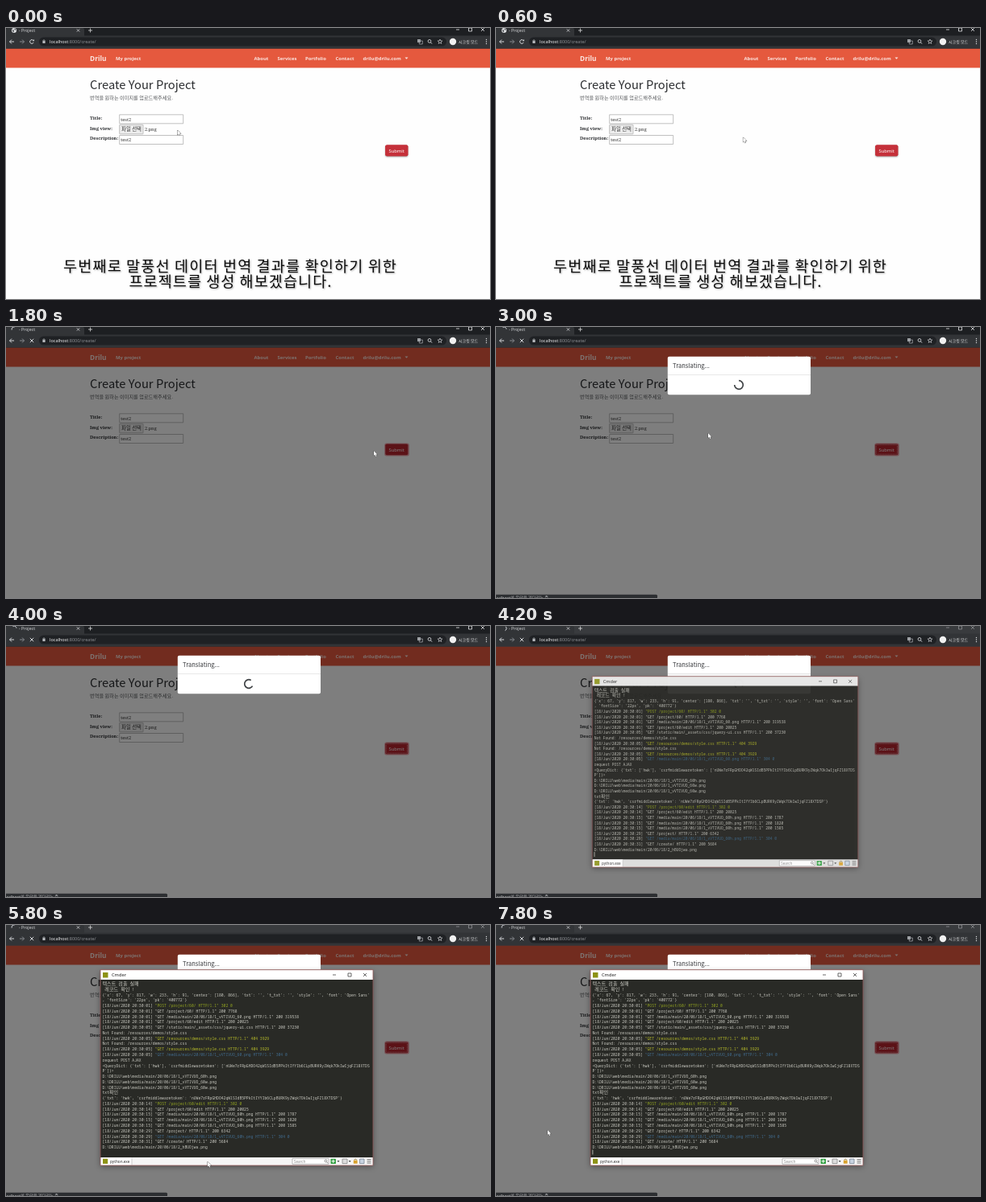
Animation, 600 px wide and 337 px high, one loop 8 s. Source, as an HTML page with a canvas:

```html
<!DOCTYPE html>
<html lang="ko">
<head>
<meta charset="utf-8">
<title>Create Your Project</title>
<style>
  html, body { margin: 0; width: 100%; height: 100%; overflow: hidden; background: #fff; }
  canvas { display: block; width: 100vw; height: 100vh; }
</style>
</head>
<body>
<canvas id="stage"></canvas>
<script>
const W = 600, H = 337, LOOP = 8000;
const canvas = document.getElementById('stage');
const ctx = canvas.getContext('2d');
const dpr = window.devicePixelRatio || 1;
canvas.width = W * dpr;
canvas.height = H * dpr;

const SANS = '"Noto Sans", "Noto Sans CJK KR", "Noto Sans CJK", sans-serif';
const KOREAN = '"Noto Sans CJK KR", "Noto Sans CJK", sans-serif';
const SERIF = '"Noto Serif", serif';
const MONO = '"Noto Sans Mono", monospace';

const clamp = v => Math.max(0, Math.min(1, v));
const progress = (t, start, end) => clamp((t - start) / (end - start));
const smooth = p => p * p * (3 - 2 * p);

// Small type is laid out ten times larger, which keeps its spacing even.
function text(str, x, y, size, color, font = SANS, weight = 400, spacing = 0) {
  ctx.save();
  ctx.translate(x, y);
  ctx.scale(0.1, 0.1);
  ctx.font = `${weight} ${size * 10}px ${font}`;
  ctx.letterSpacing = `${spacing * 10}px`;
  ctx.fillStyle = color;
  ctx.fillText(str, 0, 0);
  ctx.restore();
}

function rect(x, y, w, h, fill, radius = 0, stroke) {
  ctx.beginPath();
  ctx.roundRect(x, y, w, h, radius);
  if (fill) { ctx.fillStyle = fill; ctx.fill(); }
  if (stroke) { ctx.strokeStyle = stroke; ctx.lineWidth = 0.8; ctx.stroke(); }
}

function lines(color, width, ...paths) {
  ctx.strokeStyle = color;
  ctx.lineWidth = width;
  ctx.beginPath();
  for (const [x, y, ...rest] of paths) {
    ctx.moveTo(x, y);
    for (let i = 0; i < rest.length; i += 2) ctx.lineTo(rest[i], rest[i + 1]);
  }
  ctx.stroke();
}

function arc(x, y, r, color, width, from = 0, to = Math.PI * 2) {
  ctx.beginPath();
  ctx.arc(x, y, r, from, to);
  ctx.strokeStyle = color;
  ctx.lineWidth = width;
  ctx.stroke();
}

function disc(x, y, r, color) {
  ctx.beginPath();
  ctx.arc(x, y, r, 0, Math.PI * 2);
  ctx.fillStyle = color;
  ctx.fill();
}

function polygon(fill, ...points) {
  ctx.beginPath();
  for (let i = 0; i < points.length; i += 2) ctx.lineTo(points[i], points[i + 1]);
  ctx.closePath();
  ctx.fillStyle = fill;
  ctx.fill();
}

function cross(x, y, r, color, width = 0.8) {
  lines(color, width, [x - r, y - r, x + r, y + r], [x - r, y + r, x + r, y - r]);
}

function windowButtons(xs, y, r, color) {
  lines(color, 0.8, [xs[0] - r, y, xs[0] + r, y]);
  rect(xs[1] - r, y - r, r * 2, r * 2, null, 0, color);
  cross(xs[2], y, r, color);
}

function drawBrowser(t, loading) {
  const inactive = t > 4050;
  rect(0, 0, W, 25.4, inactive ? '#393b3e' : '#1d1f22');
  rect(0, 0, 97, 12, '#323437', 2);
  rect(0, 9.5, W, 15.9, '#323437');
  rect(41, 11.5, 505, 11, '#1f2124', 5.5);

  if (loading) {
    const a = t / 1000 * Math.PI * 2 - 2.1;
    arc(10, 3, 3, '#d0d3d8', 1, a, a + 2);
  } else {
    disc(10, 3, 3, '#e4e5e7');
    polygon('#4a4c50', 7.6, 2, 9.6, 2.6, 10, 4.4, 9, 5.6);
    polygon('#4a4c50', 10.2, 0.4, 12, 1.4, 12.2, 3, 10.8, 2.4);
  }
  text('- Project', 16, 5, 5.2, '#d5d6d8');
  cross(89.5, 3, 1.7, '#d0d1d3');
  lines('#c3c4c6', 0.9, [102, 3, 107, 3], [104.5, 0.5, 104.5, 5.5]);
  windowButtons([560, 575.5, 591], 2, 2, inactive ? '#8d8f92' : '#e2e3e5');

  lines('#d3d5d8', 1, [10, 17, 4.5, 17], [7, 14.5, 4.5, 17, 7, 19.5]);
  lines('#85888c', 1, [17, 17, 22.5, 17], [20, 14.5, 22.5, 17, 20, 19.5]);
  if (loading) cross(32, 17, 2.2, '#d3d5d8', 1);
  else {
    arc(32, 17, 2.4, '#d3d5d8', 1, 0.4, 5.5);
    polygon('#d3d5d8', 32.7, 16.3, 35, 16.3, 35, 14);
  }
  arc(47, 16, 1.2, '#b7babe', 0.7, Math.PI, 0);
  rect(45.4, 16, 3.2, 3, '#b7babe');
  text('localhost', 54, 19, 5.5, '#f1f1f2');
  text(':8000/create/', 77.3, 19, 5.5, '#8f9296');

  rect(510, 14, 4, 4, '#9da0a4');
  rect(512.3, 16, 4, 4, null, 0, '#9da0a4');
  arc(525, 16.4, 1.9, '#d0d2d5', 0.9);
  lines('#d0d2d5', 1, [526.4, 17.8, 528, 19.6]);
  const star = [];
  for (let i = 0; i < 11; i++) {
    const r = i % 2 ? 1.3 : 3, a = i * Math.PI / 5 - Math.PI / 2;
    star.push(538 + r * Math.cos(a), 17 + r * Math.sin(a));
  }
  lines('#d0d2d5', 0.7, star);
  disc(554, 17, 4.2, '#f1f1f1');
  text('시크릿 모드', 561, 19, 5, '#e2e3e5', KOREAN);
  for (const y of [14.5, 17, 19.5]) disc(595.5, y, 0.7, '#dedfe1');
}

function field(y, value) {
  rect(140.7, y, 79, 11, '#fff', 0, '#b0b0b0');
  text(value, 142.3, y + 7.7, 5.7, '#333', SERIF);
}

function drawSubmit(t) {
  const hover = t > 1100 && t < 1750, focused = t > 1500;
  if (focused) rect(469.2, 144.4, 30.6, 16, 'rgba(220,70,85,.5)', 2.5);
  else {
    ctx.save();
    ctx.shadowColor = 'rgba(0,0,0,.4)';
    ctx.shadowBlur = 2 * dpr;
    ctx.shadowOffsetY = dpr;
    rect(470.3, 145.5, 28, 13.7, '#c5303a', 1.8);
    ctx.restore();
  }
  rect(470.3, 145.5, 28, 13.7, hover || focused ? '#b8242f' : '#c5303a', 1.8);
  if (t > 2400) {
    ctx.setLineDash([1, 1]);
    rect(471.3, 146.5, 26, 11.7, null, 1, '#e5a9ae');
    ctx.setLineDash([]);
  }
  text('Submit', 474.5, 154.6, 5.8, '#fff', SANS, 500);
}

function drawPage(t) {
  rect(0, 25, W, H - 25, '#fefefe');
  rect(0, 25, W, 24.6, '#e5593e');
  text('Drilu', 104, 40.5, 8.3, '#fbe6e1', SANS, 700);
  const menu = [['My project', 136], ['About', 307.5], ['Services', 336.5],
    ['Portfolio', 371], ['Contact', 408.5], ['drilu@drilu.com', 442.5]];
  for (const [label, x] of menu) text(label, x, 39.7, 5.9, '#fbe6e1', SANS, 700);
  polygon('#fbe6e1', 494.5, 36.5, 498.5, 36.5, 496.5, 38.7);

  text('Create Your Project', 104, 76, 14.75, '#2b2d30', KOREAN);
  text('번역을 원하는 이미지를 업로드해주세요.', 104, 89.3, 6.2, '#55575a', KOREAN);
  text('Title:', 104, 114, 5.8, '#2b2d30', SERIF, 700);
  text('Img view:', 104, 126.7, 5.7, '#2b2d30', SERIF, 700);
  text('Description:', 104, 139.3, 5.65, '#2b2d30', SERIF, 700);
  field(107.8, 'test2');
  field(133.5, 'test2');
  rect(140.7, 120.3, 29.3, 11.5, '#ededed', 0.5, '#b0b0b0');
  text('파일 선택', 143, 128.3, 6.4, '#333', KOREAN);
  text('2.png', 172, 128, 5.7, '#333', SERIF);
  drawSubmit(t);

  ctx.globalAlpha = 0.5 * progress(t, 1640, 1790);
  rect(0, 25, W, H - 25, '#000');
  ctx.globalAlpha = 1;
}

function drawCaption(t) {
  ctx.save();
  ctx.globalAlpha = 1 - progress(t, 600, 950);
  ctx.shadowColor = 'rgba(0,0,0,.35)';
  ctx.shadowBlur = 2 * dpr;
  ctx.shadowOffsetX = ctx.shadowOffsetY = dpr;
  text('두번째로 말풍선 데이터 번역 결과를 확인하기 위한', 71, 303, 18.6, '#0c0c0c', KOREAN, 500, 1.1);
  text('프로젝트를 생성 해보겠습니다.', 152.5, 322, 18.6, '#0c0c0c', KOREAN, 500, 1);
  ctx.restore();
}

function drawModal(t) {
  const p = progress(t, 1880, 2180);
  if (!p) return;
  ctx.save();
  ctx.globalAlpha = p;
  ctx.translate(0, -16 * (1 - p) ** 2);
  rect(212.8, 36.7, 177.2, 47.5, '#fff', 2);
  text('Translating...', 219, 50.5, 7.6, '#35373a', KOREAN);
  lines('#e3e3e3', 0.8, [213, 59.5, 390, 59.5]);
  const a = t / 750 * Math.PI * 2 - Math.PI / 2;
  arc(301, 72, 5.3, '#3f4245', 1.7, a, a + Math.PI * 1.5);
  ctx.restore();
}

function drawStatusBar(t) {
  if (t < 2100) return;
  rect(-4, 332.7, 204, 10, '#2c2e31', 1.5);
  text('localhost의 응답을 기다리는 중...', -4, 339, 5.2, '#c2c3c5');
}

const TOKEN = 'nUWe7rFRpGHDO42qW1SIdB5PPkItIYYIb6CLpBURK9yZWqk7OkIwIjqFZ18XTDS';
const MEDIA = '/media/main/20/06/18/1_vVTIVUO_60';
const FOLDER = 'D:\\DRILU\\web\\media/main/20/06/18/';
const STYLE = '/resources/demos/style.css';
const STATUS_COLORS = { 302: '#96a820', 404: '#b8bd2a', 304: '#426d90' };
const log = (sec, request, status) => [
  `[18/Jun/2020 20:30:${sec}] `, `"${request} HTTP/1.1" ${status}`, STATUS_COLORS[status.slice(0, 3)]];
const OUTPUT = [
  '텍스트 검출 실패',
  ' 레코드 확인 !',
  "{'x': 67, 'y': 817, 'w': 233, 'h': 91, 'center': [180, 866], 'txt': '', 't_txt': '', 'style': '', 'font': 'Open Sans'",
  ", 'fontSize': '22px', 'pk': '400772'}",
  log('01', 'POST /project/60/', '302 0'),
  log('01', 'GET /project/60/', '200 7768'),
  log('01', `GET ${MEDIA}.png`, '200 319538'),
  log('01', 'GET /project/60/edit', '200 20025'),
  log('05', 'GET /static/main/_assets/css/jquery-ui.css', '200 37230'),
  `Not Found: ${STYLE}`,
  log('05', `GET ${STYLE}`, '404 3929'),
  `Not Found: ${STYLE}`,
  log('05', `GET ${STYLE}`, '404 3929'),
  log('05', `GET ${MEDIA}.png`, '304 0'),
  'request POST AJAX',
  `<QueryDict: {'txt': ['hwk'], 'csrfmiddlewaretoken': ['${TOKEN}`,
  "P']}>",
  `${FOLDER}1_vVTIVUO_60h.png`,
  `${FOLDER}1_vVTIVUO_60w.png`,
  `${FOLDER}1_vVTIVUO_60w.png`,
  'txt확인',
  `{'txt': 'hwk', 'csrfmiddlewaretoken': '${TOKEN}P'}`,
  log('14', 'POST /project/60/edit', '302 0'),
  log('14', 'GET /project/60/edit', '200 20025'),
  log('15', `GET ${MEDIA}h.png`, '200 1787'),
  log('15', `GET ${MEDIA}h.png`, '200 1820'),
  log('15', `GET ${MEDIA}h.png`, '200 1585'),
  log('29', 'GET /project/', '200 6342'),
  log('29', `GET ${MEDIA}h.png`, '304 0'),
  log('31', 'GET /create/', '200 5684'),
  `${FOLDER}2_hBUOjwa.png`,
];
const CELL = 2.832, ROW = 6.77;

// Hangul fills two terminal cells, everything else one.
function terminalText(str, x, y, color) {
  for (const run of str.match(/[가-힣]+|[^가-힣]+/g)) {
    const wide = /[가-힣]/.test(run);
    text(run, x, y, wide ? 6.1 : 4.72, color, wide ? KOREAN : MONO);
    x += run.length * CELL * (wide ? 2 : 1);
  }
}

function drawTerminal(t) {
  if (t < 4050) return;
  const k = (1 - progress(t, 4050, 4350)) ** 2;
  const scale = 1 - 0.1 * k;
  ctx.save();
  ctx.globalAlpha = 1 - 0.5 * k;
  ctx.translate(286 - 8 * k, 299 + 4 * k);
  ctx.scale(scale, scale);
  ctx.translate(-286, -299);

  ctx.save();
  ctx.shadowColor = 'rgba(0,0,0,.4)';
  ctx.shadowBlur = 7 * dpr;
  ctx.shadowOffsetY = 2 * dpr;
  rect(117, 55.7, 338, 243.3, '#292a26');
  ctx.restore();
  rect(117, 55.7, 338, 12.2, '#fff');
  rect(120, 59, 6.5, 6.5, '#8d9216');
  text('Cmder', 131, 64.3, 5.7, '#222');
  windowButtons([407, 426, 445], 62, 2, '#444');

  OUTPUT.forEach((line, i) => {
    const y = 75 + ROW * i;
    const [head, tail = '', color = '#cbcbc3'] = [].concat(line);
    terminalText(head, 119.5, y, '#cbcbc3');
    if (tail) terminalText(tail, 119.5 + head.length * CELL, y, color);
  });
  if ((t - 4200 + 1060) % 1060 < 530) rect(119.5, 279.6, 0.8, 6, '#d5d5cd');

  rect(117, 289, 338, 10, '#f6f6f6');
  rect(118, 289, 38, 9.5, '#fff');
  rect(120, 290.7, 6.2, 6.2, '#8d9216');
  text('python.exe', 129, 295.9, 4.7, '#333');
  lines('#bbb', 0.7, [156, 289.5, 156, 298.5]);
  rect(355, 290.4, 45, 7, '#fff', 0, '#aaa');
  text('Search', 357, 295.7, 4.5, '#888');
  arc(396.5, 293.4, 1.4, '#666', 0.7);
  lines('#666', 0.8, [397.5, 294.5, 399, 296.2]);
  rect(402.5, 290.7, 6.5, 6.2, '#35a044', 0.7);
  lines('#fff', 1, [405.7, 291.7, 405.7, 295.9], [403.6, 293.8, 407.8, 293.8]);
  polygon('#444', 410.5, 293, 413.5, 293, 412, 295);
  rect(417, 291, 6, 5.6, '#dedede', 0, '#888');
  polygon('#444', 424.7, 293, 427.7, 293, 426.2, 295);
  arc(433.2, 292.6, 1.5, '#8f7430', 0.8, Math.PI, 0);
  rect(430.8, 292.7, 4.8, 4, '#d9a22d');
  rect(438.5, 291, 5.5, 5.6, '#c9d4e2', 0, '#7c8795');
  lines('#555', 0.8, [447.5, 291.6, 452.5, 291.6], [447.5, 293.8, 452.5, 293.8], [447.5, 296, 452.5, 296]);
  rect(117, 55.7, 338, 243.3, null, 0, '#965a5a');
  ctx.restore();
}

const POINTER = [
  [250, 212.5, 127], [1150, 490.5, 153.5], [1640, 490.5, 153.5], [1800, 456, 154],
  [2800, 263, 132], [3200, 263, 132], [3700, 240, 346], [4300, 246, 346],
  [4800, 250, 294.5], [6000, 250, 294.5], [7200, 64, 255]];

function drawPointer(t) {
  let next = POINTER.findIndex(([time]) => time > t);
  if (next < 0) next = POINTER.length - 1;
  const [t0, x0, y0] = POINTER[Math.max(0, next - 1)];
  const [t1, x1, y1] = POINTER[next];
  const p = t1 > t0 ? smooth(progress(t, t0, t1)) : 0;
  ctx.save();
  ctx.translate(x0 + (x1 - x0) * p, y0 + (y1 - y0) * p);
  const hand = t > 1100 && t < 1680;
  const shape = new Path2D(hand
    ? 'M0 .6Q.7-.4 1.4.6V3L4.5 3.7V6L3.6 8H.2L-2 4.7-1.2 4 0 5Z'
    : 'M0 0V6L1.4 4.8 2.3 6.9 3.3 6.4 2.4 4.4H4.3Z');
  ctx.strokeStyle = '#444';
  ctx.lineWidth = 0.8;
  ctx.stroke(shape);
  ctx.fillStyle = '#fff';
  ctx.fill(shape);
  ctx.restore();
}

function draw(now) {
  // The pointer rests at its last stop once the path has run out.
  const t = now % LOOP;
  ctx.setTransform(dpr, 0, 0, dpr, 0, 0);
  drawPage(t);
  drawBrowser(t, t > 1680);
  drawCaption(t);
  drawModal(t);
  drawStatusBar(t);
  drawTerminal(t);
  drawPointer(t);
}

const start = performance.now();
function frame() {
  draw(performance.now() - start);
  requestAnimationFrame(frame);
}
frame();
</script>
</body>
</html>
```
